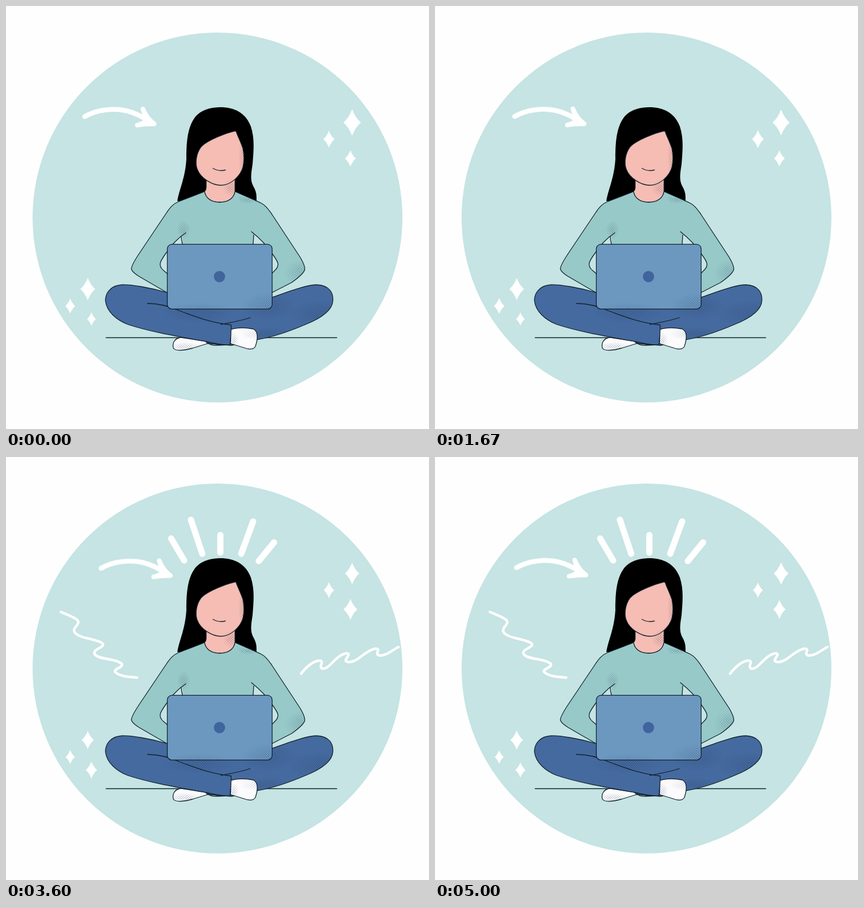
An HTML page without scripts for the animation above (5.03 s loop, 748 by 748 pixels).

```html
<!DOCTYPE html>
<html lang="en">
<head>
<meta charset="utf-8">
<title>Working with a laptop</title>
<style>
html, body { margin: 0; width: 100%; height: 100%; overflow: hidden; background: #fefefe; }
svg { display: block; width: 100vw; height: 100vh; }
.ink { stroke: #10202a; stroke-width: 1.3; stroke-linecap: round; stroke-linejoin: round; }
.line { fill: none; }
.chalk { fill: none; stroke: #fff; stroke-linecap: round; stroke-linejoin: round; }
.skin { fill: #f5bdb4; }
.knit { fill: #97c9c9; }
.denim { fill: #456a9f; }
.shoe { fill: #fbfbfd; }
.sky { fill: #c5e4e3; }

.arrow, .waves, .rays, .a, .b, .c { animation: 5.03s linear infinite; }
.arrow { animation-name: sway; }
.waves { animation-name: waves; animation-timing-function: step-end; }
.rays { animation-name: rays; animation-timing-function: step-end; }
.a, .b, .c { animation-timing-function: ease-in-out; }
.a { animation-name: pulseA; }
.b { animation-name: pulseB; }
.c { animation-name: pulseC; }

/* a sine of 1.65 s, cut where the loop restarts */
@keyframes sway {
  0% { transform: translate(0, 0); animation-timing-function: cubic-bezier(.36,.42,.65,1); }
  11.21%, 44.01%, 76.81% { transform: translate(41px, 2px); animation-timing-function: cubic-bezier(.37,0,.63,1); }
  27.61%, 60.41% { transform: translate(-12px, -1px); animation-timing-function: cubic-bezier(.37,0,.63,1); }
  93.22% { transform: translate(-12px, -1px); animation-timing-function: cubic-bezier(.35,0,.67,.43); }
  100% { transform: translate(7.8px, .4px); }
}
@keyframes waves {
  0%, 23.96%, 56.76%, 89.56% { opacity: 0; }
  .74%, 33.54%, 66.34%, 99.15%, 100% { opacity: 1; }
}
@keyframes rays {
  0%, 7.55%, 40.36%, 73.16% { opacity: 0; }
  .74%, 33.54%, 66.34%, 99.15%, 100% { opacity: 1; }
}
@keyframes pulseA {
  0%, 16.5% { transform: scale(1); }
  8.25%, 24.85% { transform: scale(.76); }
  33.2% { transform: scale(.98); }
  44.33% { transform: scale(.83); }
  52.7% { transform: scale(.96); }
  61.03% { transform: scale(.7); }
  82.9% { transform: scale(.95); }
  91% { transform: scale(.74); }
  99.4%, 100% { transform: scale(.85); }
}
@keyframes pulseB {
  0%, 16.5% { transform: scale(.79); }
  8.25%, 24.85% { transform: scale(.95); }
  33.2% { transform: scale(.84); }
  44.33% { transform: scale(.69); }
  61.03% { transform: scale(1); }
  72% { transform: scale(.74); }
  82.9% { transform: scale(.82); }
  91% { transform: scale(.96); }
  99.4%, 100% { transform: scale(.71); }
}
@keyframes pulseC {
  0% { transform: scale(.77); }
  16.5% { transform: scale(1); }
  33.2% { transform: scale(.76); }
  44.33%, 61.03% { transform: scale(.9); }
  52.7% { transform: scale(.78); }
  72% { transform: scale(.98); }
  82.9% { transform: scale(.77); }
  99.4%, 100% { transform: scale(.88); }
}
</style>
</head>
<body>
<svg viewBox="0 0 748 748">
  <defs>
    <path id="star" fill="#fff" d="M0-1Q.25-.34 .66 0Q.25 .34 0 1Q-.25 .34-.66 0Q-.25-.34 0-1Z"/>
    <pattern id="dots" width="3" height="3" patternUnits="userSpaceOnUse" patternTransform="rotate(45)">
      <circle cx="1.5" cy="1.5" r=".75" fill="#1b2c4c"/>
    </pattern>
    <radialGradient id="fade">
      <stop offset=".2" stop-color="#fff"/>
      <stop offset="1" stop-color="#fff" stop-opacity="0"/>
    </radialGradient>
    <mask id="shade" maskUnits="userSpaceOnUse" x="0" y="0" width="748" height="748">
      <g fill="url(#fade)">
        <ellipse cx="340" cy="542" rx="62" ry="18"/>
        <ellipse cx="560" cy="545" rx="62" ry="24"/>
        <ellipse cx="460" cy="580" rx="45" ry="12"/>
        <ellipse cx="464" cy="531" rx="48" ry="24"/>
        <ellipse cx="523" cy="472" rx="30" ry="24"/>
        <ellipse cx="314" cy="396" rx="12" ry="17"/>
        <ellipse cx="420" cy="268" rx="9" ry="42"/>
        <ellipse cx="400" cy="322" rx="18" ry="16"/>
        <ellipse cx="428" cy="342" rx="22" ry="8"/>
        <ellipse cx="316" cy="603" rx="30" ry="9"/>
        <ellipse cx="402" cy="592" rx="10" ry="16"/>
      </g>
    </mask>
    <clipPath id="figure">
      <path id="legR" d="M471 515C500 505 530 493 550 493C570 494 579 505 578 521C577 540 555 553 530 563C502 575 472 586 443 590L399 600L357 597L290 536Z"/>
      <path id="legL" d="M286 507C255 498 220 492 205 493C185 494 175 508 176 522C178 540 195 555 215 563C260 578 320 587 357 594Q380 600 396 599Q399 583 398 564L290 535Z"/>
      <path id="armR" d="M440 344Q453 348 462 359L520 444Q530 461 528 467Q525 475 505 489L470 514Z"/>
      <path id="face" d="M405 221C390 224 355 238 345 249C335 262 335 280 338 288C344 305 365 317 380 317C398 317 415 300 419 285C422 272 421 262 419 252C415 240 410 231 407 222Z"/>
      <path id="neck" d="M354 300V320Q354 325 351 328C353 340 363 347 378 347C393 347 403 340 405 328V300Z"/>
      <path id="footL" d="M309 586C297 588 294 597 296 605C300 611 315 609 330 605L356 597L355 593Z"/>
      <path id="footR" d="M398 572C410 568 425 569 437 571C447 576 445 590 441 602C437 609 428 607 420 604L397 597Z"/>
      <path d="M300 380H325V421H300ZM405 333L443 346L420 352Z"/>
      <rect id="lid" x="285.300" y="421.300" width="185.300" height="114.500" rx="8"/>
    </clipPath>
  </defs>

  <rect width="748" height="748" fill="#fefefe"/>
  <circle class="sky" cx="374" cy="374" r="327"/>

  <g class="chalk rays" stroke-width="11">
    <path d="M292 144L315 183M327 111L347 171M379 138V169M437 114L416 171M474 151L447 184"/>
  </g>
  <g class="chalk waves" stroke-width="4.500">
    <path d="M97 274C107 278 120 283 126 288C133 296 117 301 121 309C127 321 158 321 170 329C178 337 151 339 157 349C165 359 196 356 205 366C207 373 190 374 193 380C200 388 218 389 232 390"/>
    <path d="M522 383C531 371 545 359 556 360C563 363 552 370 559 374C572 377 583 349 603 347C612 349 595 359 603 362C620 366 632 344 652 339C666 338 650 348 660 351C672 352 682 342 694 336"/>
  </g>
  <g class="chalk arrow">
    <path stroke-width="8.500" d="M139 195.500C160 183 190 180 212 185C230 189 245 198 257 206"/>
    <path fill="#fff" stroke-width="8" d="M242 182Q249 199 262 208.500Q246 208 232 210.500Q244 207 248 203Z"/>
  </g>

  <g transform="translate(612 206) scale(23.5)"><use href="#star" class="a"/></g>
  <g transform="translate(571 235.500) scale(19)"><use href="#star" class="b"/></g>
  <g transform="translate(609 269.500) scale(19)"><use href="#star" class="c"/></g>
  <g transform="translate(144.500 500.500) scale(20)"><use href="#star" class="a"/></g>
  <g transform="translate(113.500 530.500) scale(17)"><use href="#star" class="b"/></g>
  <g transform="translate(151 553.500) scale(15.5)"><use href="#star" class="c"/></g>

  <path class="ink" d="M177 586.500H585"/>
  <path d="M303 345C306 325 317 305 319 270C319 240 321 215 334 197C346 182 365 179 379 179C404 179 424 189 433 213C440 235 438 255 436 280C433 298 432 308 437 318Q443 328 443 338V346L378 350Z"/>
  <use href="#neck" class="skin ink"/>
  <use href="#face" class="skin ink"/>
  <path class="ink line" d="M366 287Q376 293 388 290"/>

  <path class="knit ink" d="M351 328C340 333 325 338 305 346C295 350 290 357 285 364L236 437Q220 461 222 466Q224 471 235 478L285 507H470L505 489Q525 475 528 467Q530 461 520 444L470 368C465 361 460 353 452 349C440 343 420 335 405 328C403 340 393 347 378 347C363 347 353 340 351 328Z"/>
  <path class="sky" d="M312 406C300 414 291 426 283 437C272 452 268 459 279 468L287 475V422H312ZM438 404C450 412 461 423 470 437C482 453 485 459 475 468L469 475V422H437Z"/>
  <path class="ink line" d="M318 401C300 413 291 426 283 437C272 452 268 459 279 468L286 474M310 408Q310 414 312 421M434 399C449 411 461 423 470 437C482 453 485 459 475 468L469 474M438 405L437 421"/>

  <use href="#footL" class="shoe ink"/>
  <use href="#legR" class="denim ink"/>
  <use href="#legL" class="denim"/>
  <path class="ink line" d="M286 507C255 498 220 492 205 493C185 494 175 508 176 522C178 540 195 555 215 563C260 578 320 587 357 594Q380 600 396 599Q399 583 398 564C360 560 335 549 307 539C287 530 270 526 250 526M432 551C415 557 400 559 380 563M357 594Q360 601 372 600L396 599"/>
  <use href="#footR" class="shoe ink"/>
  <use href="#lid" fill="#6c98c0" class="ink"/>
  <circle cx="377.500" cy="478.500" r="10" fill="#3f659c"/>
  <g clip-path="url(#figure)">
    <rect width="748" height="748" fill="url(#dots)" mask="url(#shade)" opacity=".6"/>
  </g>
</svg>
</body>
</html>
```
